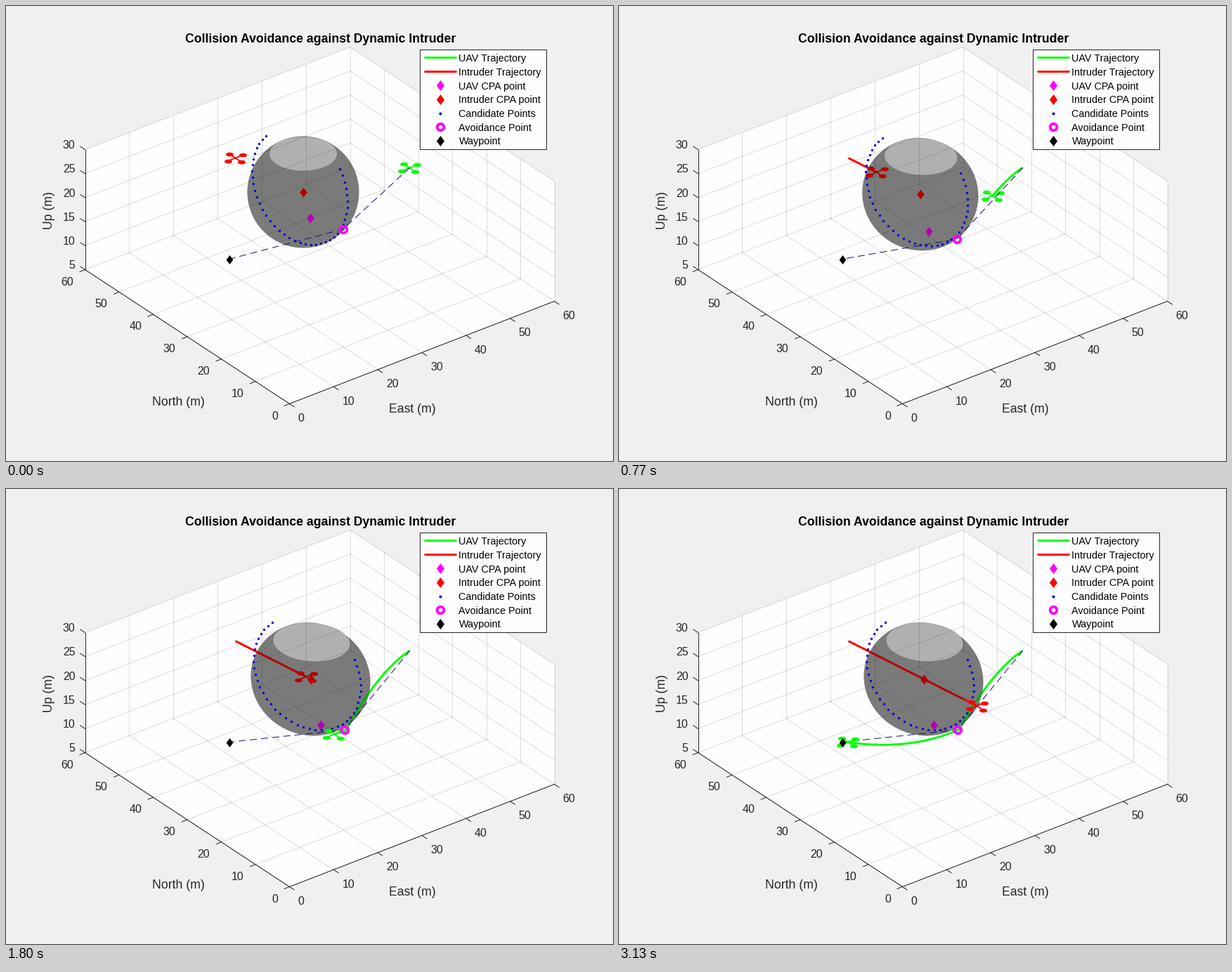
These frames come from a looping animation (864 px wide and 648 px high, 3160 ms). A matplotlib script:

```python
import numpy as np
import matplotlib.pyplot as plt
from matplotlib.animation import FuncAnimation
from matplotlib.patches import PathPatch, Polygon, Rectangle
from matplotlib.path import Path

W, H, DPI = 864, 648, 72          # at 72 dpi one point is one pixel
LOOP, TICK = 3160, 20
TURN, PASS, END = 1370, 1620, 3130   # plan fixed, avoidance point reached, arrival
DARK, LIME, RED, MAGENTA, BLUE = "#262626", "#00ff00", "#ff0000", "#ff00ff", "#0000d8"
PAPER = "#fdfdfd"

plt.rcParams["font.family"] = "Liberation Sans"
fig = plt.figure(figsize=(W / DPI, H / DPI), dpi=DPI, facecolor="#f0f0f0")
ax = fig.add_axes([0, 0, 1, 1])
ax.set(xlim=(0.5, W + 0.5), ylim=(H + 0.5, 0.5))
ax.axis("off")

# Screen vectors of one metre along each axis
ORIGIN = np.array([404, 567])
EAST = np.array([377, -146]) / 60
NORTH = np.array([-291, -191]) / 60
UP = np.array([0, -171]) / 25


def project(e, n, u):
    return ORIGIN + e * EAST + n * NORTH + (u - 5) * UP


def seg(a, b, **kw):
    return ax.plot(*zip(a, b), **kw)[0]


def label(x, y, s, size, color=DARK, ha="center", **kw):
    """Text whose capitals are centred on y."""
    ax.text(x, y + 0.35 * size, s, size=size, color=color, ha=ha, va="baseline", **kw)


def mix(a, b, g):
    return np.asarray(a) + g * np.subtract(b, a)


def bezier(a, q, b, s):
    s = np.asarray(s)[:, None]
    return mix(mix(a, q, s), mix(q, b, s), s)


# ---- axes box ----
corners = [(0, 0, 5), (60, 0, 5), (60, 0, 30), (60, 60, 30), (0, 60, 30), (0, 60, 5)]
ax.add_patch(Polygon([project(*c) for c in corners], fc=PAPER, ec="none", zorder=0))

grid = dict(color="black", alpha=0.13, lw=1, zorder=1)
rim = dict(color=DARK, lw=1, zorder=1.5)


def tick(p, direction):
    seg(p, p + 8 * direction / np.hypot(*direction), **rim)


for v in range(0, 61, 10):
    e, n = project(v, 0, 5), project(0, v, 5)
    seg(e, project(v, 60, 5), **grid)
    seg(n, project(60, v, 5), **grid)
    seg(project(v, 60, 5), project(v, 60, 30), **grid)
    if v < 60:
        seg(project(60, v, 5), project(60, v, 30), **grid)
    tick(e, -NORTH)
    tick(n, -EAST)
    label(e[0] + 12, e[1] + 20, str(v), 16, ha="left")
    label(n[0] - 16.5, n[1] + 16.5, str(v), 16, ha="right")
for u in range(5, 31, 5):
    p = project(0, 60, u)
    if u > 5:
        seg(p, project(60, 60, u), **grid)
        seg(project(60, 60, u), project(60, 0, u), **grid)
    tick(p, NORTH)
    label(99, p[1] - 7, str(u), 16, ha="right")
for a, b in [((0, 0, 5), (60, 0, 5)), ((0, 0, 5), (0, 60, 5)), ((0, 60, 5), (0, 60, 30))]:
    seg(project(*a), project(*b), **rim)

label(448, 46.5, "Collision Avoidance against Dynamic Intruder", 17.6, "black", weight="bold")
label(245.5, 563, "North (m)", 17.6)
label(578.5, 573, "East (m)", 17.6)
ax.text(70.5, 291, "Up (m)", size=17.6, color=DARK, rotation=90, ha="right", va="center")

# ---- markers ----
ANGLES = np.linspace(0, 2 * np.pi, 121)
DIAMOND = [(0, 1), (0.74, 0), (0, -1), (-0.74, 0), (0, 1)]
ROTOR = np.column_stack([np.cos(ANGLES), 0.52 * np.sin(ANGLES)])


def diamond(color, z, xy=(0, 0), size=14):
    return ax.plot(*xy, marker=DIAMOND, ms=size, mew=0, color=color, ls="", zorder=z)[0]


def ring(z, xy=(0, 0)):
    return ax.plot(*xy, "o", ms=9.6, mfc="none", mec=MAGENTA, mew=3.8, zorder=z)[0]


# ---- legend ----
ax.add_patch(Rectangle((589, 62), 180, 142, fc=PAPER, ec=DARK, lw=1, zorder=20))
names = ["UAV Trajectory", "Intruder Trajectory", "UAV CPA point", "Intruder CPA point",
         "Candidate Points", "Avoidance Point", "Waypoint"]
rows = 74.2 + 19.7 * np.arange(len(names))
for y, name in zip(rows, names):
    label(645, y + 0.5, name, 14.4, "black", ha="left", zorder=21)
for y, c in zip(rows, (LIME, RED)):
    seg((595, y - 0.5), (641, y - 0.5), color=c, lw=3, zorder=21, solid_capstyle="butt")
for k, c in ((2, MAGENTA), (3, RED), (6, "black")):
    diamond(c, 21, (618, rows[k]), 15)
ax.plot(618, rows[4], "o", ms=4, mew=0, color=BLUE, zorder=21)
ring(21, (618, rows[5]))

# ---- flight paths ----
START, GOAL = (575.5, 230.5), (318, 361)


def uav_path(t):
    """Dive to the avoidance point, then curve round to the waypoint."""
    dive = bezier((574.5, 231), (530, 261), (485, 343), t / PASS)
    cruise = bezier((485, 343), (414, 374), (326, 361), (t - PASS) / (END - PASS))
    return np.where((t < PASS)[:, None], dive, cruise)


def intruder_path(t):
    """Straight line, slightly gaining speed."""
    return mix((327, 217), (510, 309.5), ((t / END) ** 1.08)[:, None])


def oval(center, rx, ry, tilt):
    x = rx * np.cos(ANGLES)
    return np.column_stack([x, ry * np.sin(ANGLES) + tilt * x]) + center


class Drone:
    """Quadrotor with its trail; parts inside the ball sit below its front wall."""

    def __init__(self, color, path, inside):
        self.path, self.inside = path, inside
        line = dict(color=color, lw=3, solid_capstyle="butt", solid_joinstyle="round")
        self.low = ax.plot([], [], zorder=4, **line)[0]
        self.high = ax.plot([], [], zorder=8, **line)[0]
        self.arms = ax.plot([], [], color=color, lw=1.8)[0]
        self.rotors = ax.plot([], [], marker=ROTOR, ms=11, mew=0, color=color, ls="")[0]

    def move(self, t):
        trail = self.path(np.append(np.arange(0, t, 8), t))
        deep = self.inside(trail[:, 0])[:, None]
        self.low.set_data(*np.where(deep, trail, np.nan).T)
        self.high.set_data(*np.where(deep, np.nan, trail).T)
        c = trail[-1]
        tips = [c + 1.75 * EAST, c - 1.75 * EAST, c + 1.75 * NORTH, c - 1.75 * NORTH]
        self.rotors.set_data(*np.array(tips).T)
        self.arms.set_data(*np.array(tips[:2] + [(np.nan, np.nan)] + tips[2:]).T)
        for part in (self.arms, self.rotors):
            part.set_zorder(4.5 if deep[-1, 0] else 8.5)


uav = Drone(LIME, uav_path, lambda x: x > 486)
intruder = Drone(RED, intruder_path, lambda x: x < 492)

wall = dict(fc="black", ec="none", alpha=0.3)
back = ax.add_patch(PathPatch(Path([(0, 0)]), zorder=3, **wall))
front = ax.add_patch(PathPatch(Path([(0, 0)]), zorder=6, **wall))
int_cpa = diamond(RED, 5)
uav_cpa = diamond(MAGENTA, 5)
avoid = ring(9)
route = ax.plot([], [], color="#14146e", lw=1, dashes=(10, 6), zorder=7)[0]
dots = ax.plot([], [], "o", ms=3.4, mew=0, color=BLUE, zorder=7.5)[0]
diamond("black", 10, GOAL, 13)

# 41 candidates on a tilted circle
FAN = np.radians(6.45 * np.arange(-20, 21))[:, None]


def place(mark, xy):
    mark.set_data([xy[0]], [xy[1]])


def update(i):
    # the picture advances 30 times a second
    step = int((i * TICK + TICK / 2 + 5) * 0.03)
    t = min(step / 0.03, END)
    g = min(t / TURN, 1)

    # the conflict zone swells and drifts until the plan is fixed
    ball = mix((423.5, 265.5), (434, 271.2), g)
    tilt = 0.05 * g
    body = Path(oval(ball, 79.5 + 5.5 * g, 79.5 + g, tilt), closed=True)
    mouth = oval(ball + (1.5 * g, 1.8 * g - 54.5), 48 + 6.5 * g, 24 + 3.3 * g, tilt)
    back.set_path(body)
    front.set_path(Path.make_compound_path(body, Path(mouth[::-1], closed=True)))

    escape = mix((480, 318.5), (482.5, 343.5), g)
    place(int_cpa, ball)
    place(uav_cpa, mix((433, 302.5), (448, 336.5), g))
    place(avoid, escape)
    route.set_data(*zip(START, escape, GOAL))

    down = np.array([-7 - 7 * g, 77 - 4 * g])
    side = np.array([67.5, 30.5]) * (1 + 0.11 * g)
    dots.set_data(*(ball + (-5, -8) + down * np.cos(FAN) + side * np.sin(FAN)).T)

    uav.move(t)
    intruder.move(t)
    return []


anim = FuncAnimation(fig, update, frames=LOOP // TICK, interval=TICK,
                     repeat=True, repeat_delay=0, blit=False)
plt.show()
```
